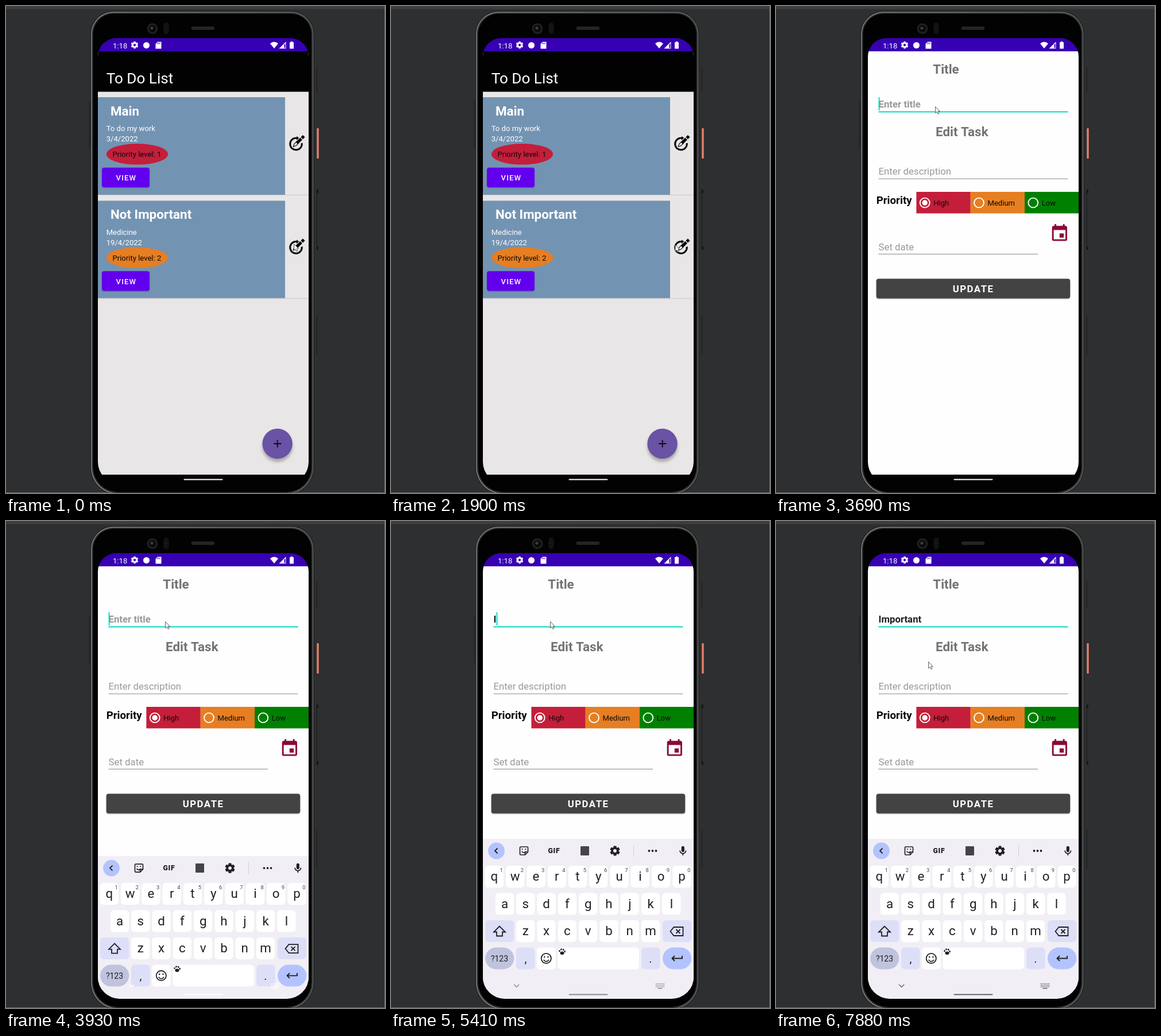
Write an HTML page with a canvas that moves like this. It is 660 by 849 pixels and loops after 8000 ms.

```html
<!DOCTYPE html>
<html lang="en">
<head>
<meta charset="utf-8">
<title>To do list</title>
<style>
html, body { margin: 0; width: 100%; height: 100%; overflow: hidden; background: #2d2f30; }
canvas { display: block; }
</style>
</head>
<body>
<canvas id="stage" width="660" height="849"></canvas>
<script>
const ctx = document.getElementById('stage').getContext('2d');
const LOOP = 8000, INK = '#1f1f24', TEAL = '#03dac5', HINT = '#999';
const RED = '#c41e3a', ORANGE = '#e67e22', GREEN = '#008000', BLUE = '#b3c3fe', LILAC = '#dddff8';

const CALENDAR = 'M17 12h-5v5h5v-5zM16 1v2H8V1H6v2H5c-1.11 0-1.99.9-1.99 2L3 19c0 1.1.89 2 2 2h14c1.1 0 2-.9 2-2V5c0-1.1-.9-2-2-2h-1V1h-2zm3 18H5V8h14v11z';
const MIC = 'M12 14c1.66 0 3-1.34 3-3V5c0-1.66-1.34-3-3-3S9 3.34 9 5v6c0 1.66 1.34 3 3 3zm5-3c0 2.76-2.24 5-5 5s-5-2.24-5-5H5c0 3.53 2.61 6.43 6 6.92V21h2v-3.08c3.39-.49 6-3.39 6-6.92h-2z';
const ARROW = 'M.500 .500V11L3 8.800L4.700 12.600L6.500 11.800L4.800 8.200H8Z';

// [time, x, y]: the pointer holds each place until the next one
const POINTER = [
  [0, 501, 414.5], [1010, 462, 398], [1130, 392, 384], [1250, 318, 382], [1370, 298, 388],
  [1510, 345, 398], [1635, 440, 410], [1760, 492, 415], [1900, 494.5, 416],
  [2800, 420, 330], [2930, 357, 258], [3080, 322, 214], [3200, 288, 184], [3320, 277, 175],
  [7880, 265, 245]
];
const WORD = 'Important';
const KEY_TIMES = [5410, 5650, 5770, 6020, 6390, 6510, 6760, 7010, 7260];

function box(x, y, w, h, color, r = 0) {
  ctx.fillStyle = color;
  ctx.beginPath();
  ctx.roundRect(x, y, w, h, r);
  ctx.fill();
}
function oval(x, y, rx, ry, color) {
  ctx.fillStyle = color;
  ctx.beginPath();
  ctx.ellipse(x, y, rx, ry, 0, 0, 7);
  ctx.fill();
}
const disc = (x, y, r, color) => oval(x, y, r, r, color);
function ring(x, y, r, color, width, from = 0, to = Math.PI * 2) {
  ctx.strokeStyle = color;
  ctx.lineWidth = width;
  ctx.beginPath();
  ctx.arc(x, y, r, from, to);
  ctx.stroke();
}
function text(s, x, y, size, color, weight = 400, align = 'left', spacing = 0) {
  ctx.font = `${weight} ${size}px Roboto, sans-serif`;
  ctx.letterSpacing = spacing + 'px';
  ctx.textAlign = align;
  ctx.fillStyle = color;
  ctx.fillText(s, x, y);
}
// A path at (x, y); a stroke width draws it as an outline
function icon(d, x, y, scale, color, stroke = 0) {
  const path = new Path2D(d);
  ctx.save();
  ctx.translate(x, y);
  ctx.scale(scale, scale);
  ctx.fillStyle = ctx.strokeStyle = color;
  ctx.lineWidth = stroke;
  if (stroke) ctx.stroke(path); else ctx.fill(path);
  ctx.restore();
}
function withShadow(color, blur, offset, paint) {
  ctx.save();
  ctx.shadowColor = color;
  ctx.shadowBlur = blur;
  ctx.shadowOffsetY = offset;
  paint();
  ctx.restore();
}
function gear(x, y, r, color, hole) {
  ctx.save();
  ctx.translate(x, y);
  for (let i = 0; i < 6; i++) {
    box(-r * .3, -r, r * .6, r, color, 1);
    ctx.rotate(Math.PI / 3);
  }
  disc(0, 0, r * .76, color);
  disc(0, 0, r * .34, hole);
  ctx.restore();
}

function drawPhone() {
  box(0, 0, 660, 849, '#2d2f30');
  box(0, 0, 660, 5.5, '#3c3f41');
  box(659, 0, 1, 849, '#6f7172');
  box(0, 848, 660, 1, '#6f7172');
  box(144.5, 166, 2, 82, '#212324');
  for (const [y, h] of [[105, 46], [320, 105], [538, 70]]) box(540, y, 2.5, h, '#242627', 1);
  for (const y of [320, 419]) box(541, y, 3, 6, '#151617', 1);
  box(541.3, 213, 3.4, 53, '#e8806d', 1);

  const shell = (inset, color) =>
    box(147 + inset, 9 + inset, 389.5 - inset * 2, 843 - inset * 2, color, [40 - inset, 40 - inset, 48 - inset, 48 - inset]);
  const metal = ctx.createLinearGradient(147, 0, 537, 0);
  metal.addColorStop(0, '#7d817e');
  metal.addColorStop(.1, '#858986');
  metal.addColorStop(.9, '#6d706e');
  metal.addColorStop(1, '#5b5e5c');
  shell(0, '#161717');
  shell(1, metal);
  shell(2.6, '#303231');
  shell(4.6, '#020202');

  disc(255, 39.5, 9.5, '#1e1f20');
  disc(255, 39.5, 6, '#08090a');
  disc(254, 38.5, 2.6, '#3a3d40');
  box(274.5, 29, 9, 20, '#151617', 4.5);
  ring(279, 34, 3, '#0a0a0a', 1);
  ring(279, 44, 3, '#0a0a0a', 1);
  box(323, 36, 40, 5.5, '#2c2d2e', 2);
  for (let x = 325; x < 362; x += 3) box(x, 37, 1, 3.5, '#111');
}

function drawStatusBar() {
  const bar = '#3700b3', white = '#fff';
  box(160, 56, 367, 23, bar);
  text('1:18', 186, 73.5, 13.1, white);
  gear(224, 68, 6.3, white, bar);
  disc(244.5, 68.5, 5.5, white);
  icon('M3.500 0H10V12H0V3.500Z', 260.5, 62.5, 1, white);
  for (let i = 0; i < 3; i++) box(263.2 + i * 2.1, 64, 1, 2.6, bar);
  icon('M0 3.200Q7 -2.600 14 3.200L7 11.600Z', 460, 62.3, 1, white);
  icon('M0 12L12 0V12Z', 475.5, 62.3, 1, white);
  icon('M9 5L11 3V11H9Z', 475.5, 62.3, 1, bar);
  box(494, 63, 7, 11.5, white, 1);
  box(496, 61.7, 3, 2, white);
}

function drawEditIcon(x, y) {
  const black = '#0a0a0a', paper = '#e8e6e7';
  ring(x, y, 10.3, black, 3, -.15, 5);
  icon('M1 -13.500L7 -9.500L1 -5.500Z', x, y, 1, black);
  ctx.save();
  ctx.translate(x - 5, y + 5);
  ctx.rotate(-Math.PI / 4);
  icon('M0 0L5 -2.600H27V2.600H5Z', 0, 0, 1, paper, 2.4);
  icon('M0 0L5 -2.600H27V2.600H5Z', 0, 0, 1, paper);
  icon('M0 0L5 -2.200H11M0 0L5 2.200H11', 0, 0, 1, black, 1.1);
  icon('M9 -2.600H20V2.600H9ZM21.500 -2.600H26.500V2.600H21.500Z', 0, 0, 1, black);
  ctx.restore();
}

function drawCard(dy, title, detail, date, level, color) {
  ctx.save();
  ctx.translate(0, dy);
  box(160, 159, 326, 170, '#7393b3');
  box(160, 329, 367, 1, '#cbc9ca');
  text(title, 182, 190.5, 22.4, '#fff', 700);
  text(detail, 174.7, 218.3, 13.08, '#fff');
  text(date, 174.7, 236.3, 13.08, '#fff');
  oval(228.5, 258.3, 53.6, 18.3, color);
  text('Priority level: ' + level, 185.5, 263.3, 13.08, '#0a0a0a');
  withShadow('#0005', 2, 1, () => box(167, 281.7, 83, 34.3, '#6200ee', 4));
  text('VIEW', 191.5, 304.3, 13.08, '#fff', 500, 'left', 1.17);
  drawEditIcon(505, 240.5);
  ctx.restore();
}

function drawList() {
  box(160, 79, 367, 738, '#e8e6e7');
  box(160, 79, 367, 70.5, '#020202');
  text('To Do List', 174.7, 134.5, 26.1, '#fff');
  drawCard(0, 'Main', 'To do my work', '3/4/2022', 1, RED);
  drawCard(180.5, 'Not Important', 'Medicine', '19/4/2022', 2, ORANGE);
  withShadow('#0004', 5, 5.5, () => disc(472.6, 763, 26.2, '#6a52a4'));
  box(466.2, 762.1, 13, 1.9, '#0a0a0a');
  box(471.7, 756.5, 1.9, 13, '#0a0a0a');
}

function drawForm(t) {
  box(160, 79, 367, 738, '#fefefe');
  text('Title', 273.3, 117.8, 22.4, '#737373', 700);
  text('Edit Task', 278, 226.8, 22.4, '#737373', 700);

  const focused = t >= 3690;
  const count = KEY_TIMES.filter(k => t >= k).length;
  const typed = WORD.slice(0, count);
  text(typed || 'Enter title', 178.5, 177.3, 16.81, typed ? INK : HINT, 700);
  if (focused) {
    const since = t - (count ? KEY_TIMES[count - 1] : 3790);
    const caret = 178.6 + (typed ? ctx.measureText(typed).width : 0);
    box(178.5, 183.5, 330, 1.9, TEAL);
    if (since % 1000 < 495) box(caret, 159, 1.9, 23, TEAL);
  } else box(178.5, 183.6, 330, 1, '#8a8a8a');

  text('Enter description', 178.5, 294.3, 16.81, HINT);
  box(178.5, 300.8, 330, 1, '#8a8a8a');
  text('Priority', 174.7, 344.5, 18.7, '#0a0a0a', 700);
  [['High', RED], ['Medium', ORANGE], ['Low', GREEN]].forEach(([label, color], i) => {
    const x = 244.4 + i * 94.3;
    box(x, 324, 94.4, 37.4, color);
    ring(x + 14.8, 343, 8.4, '#fff', 1.9);
    if (!i) disc(x + 14.8, 343, 4.7, '#fff');
    text(label, x + 29.8, 347.8, 13.08, '#0a0a0a');
  });
  text('Set date', 178.5, 425.5, 16.81, HINT);
  box(178.5, 432, 277.5, 1, '#8a8a8a');
  icon(CALENDAR, 476.3, 378.9, 1.46, '#8b0838');
  withShadow('#0005', 2, 1, () => box(174.7, 475.5, 337.5, 34.2, '#434343', 4));
  text('UPDATE', 307.7, 499.3, 16.81, '#fff', 700, 'left', 1.5);
}

function drawToolbar() {
  disc(183.5, 575, 14.4, BLUE);
  icon('M2 -4.500L-2.500 0L2 4.500', 183.5, 575, 1, INK, 1.8);
  icon('M-5.500 -7H5.500Q7 -7 7 -5.500V2L2 7H-5.500Q-7 7 -7 5.500V-5.500Q-7 -7 -5.500 -7ZM7 2H2V7M-4 1Q0 5 3 1', 231.5, 575, 1, INK, 1.7);
  disc(228.7, 572, 1.1, INK);
  disc(234.3, 572, 1.1, INK);
  text('GIF', 284, 579.2, 12.3, INK, 800, 'center', .7);
  box(330, 567, 15, 16, '#44444a', 1);
  gear(390, 575, 8.6, INK, '#f1eff5');
  box(422, 565, 1, 20, '#cfced6');
  for (let i = -1; i < 2; i++) disc(455.5 + i * 6, 575, 1.9, INK);
  icon(MIC, 498, 565, .86, INK);
}

function drawKeyboard(dy) {
  ctx.save();
  ctx.translate(0, dy);
  box(160, 554, 367, 300, '#f1eff5');
  drawToolbar();
  const key = (x, y, w, color = '#fff', r = 6) => box(x, y, w, 38, color, r);
  [['qwertyuiop', 179.8, 601], ['asdfghjkl', 198, 648.5], ['zxcvbnm', 234.2, 696]].forEach(([row, x0, y], r) => {
    [...row].forEach((c, i) => {
      const x = x0 + i * 36.3;
      key(x - 16.2, y, 32.4);
      text(c, x, y + 26.3, 22.3, INK, 400, 'center');
      if (!r) text((i + 1) % 10, x + 12.3, y + 11, 9.5, '#45454c', 400, 'center');
    });
  });
  key(164, 696, 50.3, LILAC);
  icon('M0 -9L-10 1H-5V8H5V1H10Z', 189, 715.5, 1, INK, 1.8);
  key(473, 696, 50.3, LILAC);
  icon('M-5 -7.500H11V7.500H-5L-11 0ZM-1 -3.500L6 3.500M6 -3.500L-1 3.500', 497.5, 715.5, 1, INK, 1.8);

  key(164, 743.5, 50.3, '#c0c3dd', 19);
  text('?123', 189, 768, 14, INK, 400, 'center');
  key(218, 743.5, 32.5, LILAC);
  text(',', 234.5, 770, 20, INK, 400, 'center');
  key(254, 743.5, 33);
  ring(270.3, 762.5, 8.6, INK, 1.8);
  ring(270.3, 763.3, 4.6, INK, 1.7, .3, 2.84);
  disc(267.2, 760, 1.3, INK);
  disc(273.4, 760, 1.3, INK);
  key(290.5, 743.5, 141.5);
  oval(298, 753.2, 3.6, 2.8, INK);
  for (const [x, y] of [[293.5, 749.5], [296.5, 746.8], [300.2, 747.3], [302.6, 750.4]]) oval(x, y, 1.3, 1.7, INK);
  key(436, 743.5, 32.5, LILAC);
  text('.', 452, 770, 20, INK, 400, 'center');
  key(473, 743.5, 50.3, BLUE, 19);
  icon('M9 -4.500V0H-8M-4 -4.500L-8.500 0L-4 4.500', 498, 762.5, 1, INK, 1.9);
  ctx.restore();
}

function drawNavigation(t, keyboard) {
  const step = 4070 + 240 * Math.floor((t - 4070) / 240);
  const dark = Math.min(1, Math.max(0, (step - 4070) / 1600));
  const shade = Math.round(255 - 153 * dark);
  const tint = `rgb(${shade},${shade},${shade})`;
  box(309.5, 824.5, 68, 2, tint, 1);
  if (!keyboard) return;
  icon('M-4.500 -2L0 2.500L4.500 -2', 218.7, 810, 1, tint, 1.4);
  for (let row = 0; row < 3; row++)
    for (let col = 0; col < 6; col++) box(461 + col * 2.7, 806 + row * 2.7, 1.6, 1.6, tint);
  box(464.5, 814, 8, 1.4, tint);
}

function drawPointer(t) {
  const [, x, y] = POINTER.findLast(p => t >= p[0]);
  icon(ARROW, x, y, 1.06, '#fff');
  icon(ARROW, x, y, 1.06, '#444', .8);
}

function draw(t) {
  drawPhone();
  ctx.save();
  ctx.beginPath();
  ctx.roundRect(160, 56, 367, 777, [32, 32, 38, 38]);
  ctx.clip();
  box(160, 56, 367, 777, '#020202');
  if (t < 2400) drawList(); else drawForm(t);
  drawStatusBar();
  const keyboard = t >= 3810;
  if (keyboard) {
    const step = 3810 + 120 * Math.floor((t - 3810) / 120);
    const progress = Math.min(1, (step - 3750) / 300);
    drawKeyboard(279 * (1 - progress) ** 2.43);
  }
  drawNavigation(t, keyboard);
  ctx.restore();
  drawPointer(t);
}

const start = performance.now();
(function tick() {
  draw((performance.now() - start) % LOOP);
  requestAnimationFrame(tick);
})();
</script>
</body>
</html>
```
